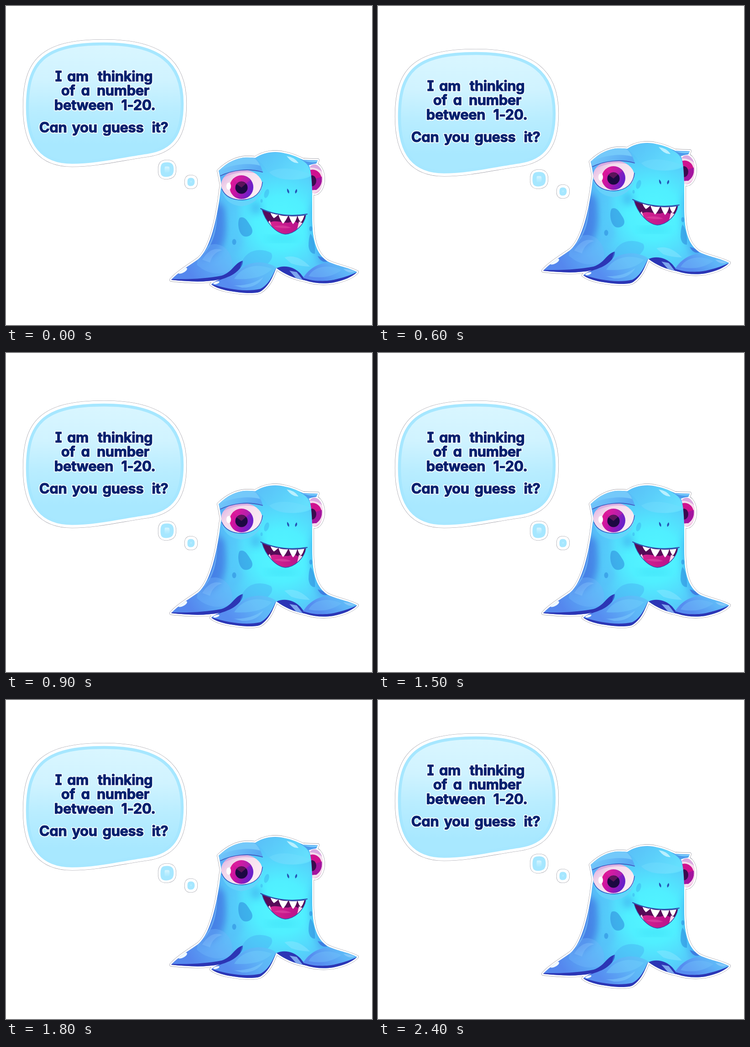
Animation of 802x699 px, one loop 2.7 s. Source, as an HTML page:

```html
<!DOCTYPE html>
<html lang="en">
<head>
<meta charset="utf-8">
<title>Guess the number</title>
<style>
html, body { margin: 0; width: 100%; height: 100%; overflow: hidden; background: #fff; }
svg { display: block; width: 802px; height: 699px; }

#bubble { animation: sink 2.7s step-end infinite; }
#monster { animation: rise 2.7s step-end infinite; }
@keyframes sink {
  0%, 88.888% { transform: translateY(0); }
  11.111%, 77.777% { transform: translateY(9px); }
  22.222%, 66.666% { transform: translateY(21px); }
  33.333%, 55.555% { transform: translateY(31px); }
  44.444% { transform: translateY(42px); }
}
@keyframes rise {
  0%, 88.888% { transform: translateY(0); }
  11.111%, 77.777% { transform: translateY(-11px); }
  22.222%, 66.666% { transform: translateY(-20px); }
  33.333%, 55.555% { transform: translateY(-30px); }
  44.444% { transform: translateY(-40px); }
}

.edge { fill: #fff; stroke: #92929c; stroke-linejoin: round; }
.rim { fill: #fff; stroke: #fff; stroke-linejoin: round; }
#bubble .edge { stroke-width: 20.2px; }
#bubble .rim { stroke-width: 19px; }
#bubble .skin { stroke: #a6e7ff; stroke-width: 6.5px; fill: url(#sky); }
#monster .edge { stroke-width: 7.8px; }
#monster .rim { stroke-width: 6.6px; }

#words {
  font: 700 31px Inter, "Open Sans", sans-serif;
  font-feature-settings: "cv08", "cv11";
  letter-spacing: -.4px;
  text-anchor: middle;
  stroke-linejoin: round;
}
.halo { fill: #f4fcff; stroke: #f4fcff; stroke-width: 5px; }
.ink { fill: #04206e; stroke: #04206e; stroke-width: 1.1px; }
.soft { filter: url(#blur); }
.shade { fill: #2c35b5; }
.spot { fill: #2f8fe0; opacity: .6; }
.faint { opacity: .3; }
.line { fill: none; stroke-linecap: round; }
</style>
</head>
<body>
<svg viewBox="0 0 802 699" role="img" aria-label="A blue monster thinking of a number">
<defs>
  <filter id="blur" x="-50%" y="-50%" width="200%" height="200%"><feGaussianBlur stdDeviation="8"/></filter>
  <linearGradient id="sky" x2="0" y2="1">
    <stop stop-color="#d9f6ff"/><stop offset=".3" stop-color="#d0f3ff"/>
    <stop offset=".55" stop-color="#b9edff"/><stop offset=".85" stop-color="#a8e8ff"/>
  </linearGradient>
  <radialGradient id="body" gradientUnits="userSpaceOnUse" cx="604" cy="474" r="230">
    <stop stop-color="#52f6ff"/><stop offset=".25" stop-color="#50efff"/>
    <stop offset=".48" stop-color="#55d2fb"/><stop offset=".72" stop-color="#5aaef6"/>
    <stop offset="1" stop-color="#5587ee"/>
  </radialGradient>
  <linearGradient id="cap" x2="1" y2=".5">
    <stop stop-color="#59bdf8"/><stop offset=".5" stop-color="#5bcefa"/><stop offset="1" stop-color="#64dffd"/>
  </linearGradient>
  <linearGradient id="brow" x2="1" y2=".3">
    <stop stop-color="#78cdfb"/><stop offset="1" stop-color="#58a9f3"/>
  </linearGradient>
  <linearGradient id="foot" x2="1" y2="-.35">
    <stop stop-color="#568cf0"/><stop offset=".5" stop-color="#5eb5f7"/><stop offset="1" stop-color="#5acbf9"/>
  </linearGradient>
  <linearGradient id="iris" x2="1" y2=".35">
    <stop stop-color="#ee1b8c"/><stop offset=".45" stop-color="#c313a6"/><stop offset="1" stop-color="#6a20c9"/>
  </linearGradient>
  <linearGradient id="white" x2="1" y2=".7">
    <stop stop-color="#d8a6df"/><stop offset=".35" stop-color="#f3d8ec"/><stop offset="1" stop-color="#fdeef4"/>
  </linearGradient>
  <linearGradient id="tongue" x2="1"><stop stop-color="#d8248f"/><stop offset="1" stop-color="#b5108b"/></linearGradient>

  <path id="cloud" d="M47 222C47 125 80 83 215 83C336 83 386 125 386 214C386 280 365 313 309 321C258 328 198 342.500 145 342.500C80 342.500 47 305 47 222Z"/>
  <path id="puff" d="M343 359C343 348 345 347 353 347C361 347 363 350 363 358C363 367 361 369 351 370C344 370 343 368 343 359Z"/>
  <path id="dot" d="M401 386C401 380 402 380 405 380C409 380 410 381 410 385C410 390 409 391 405 391C401 391 401 390 401 386Z"/>

  <path id="torso" d="M466 361C484 344 505 333 526 332Q538 332 546 333C566 320 590 317 612 323C628 326 640 332 651 337Q667 338 683 338L680 345Q671 346 664 349Q670 364 671 411L671 462C671 507 677 539 702 558C718 568 748 572 769 583C760 593 741 601 717 606C696 609 676 608 655 601C631 597 610 587 592 574C585 592 577 614 557 626C542 632 508 628 482 623Q460 618 450 610Q456 604 469 599C436 606 400 604 362 600C375 585 398 571 421 555C449 532 462 463 468 421Q470 403 472 393Q469 374 466 361Z"/>
  <ellipse id="farEye" cx="676" cy="379" rx="19" ry="32"/>
  <g id="form"><use href="#farEye"/><use href="#torso"/></g>
  <ellipse id="eye" cx="516.500" cy="391.500" rx="45" ry="33"/>
  <path id="mouth" d="M561 445C589 457 625 462 657 457C654 478 633 498 612 499C590 497 568 470 561 445Z"/>
  <clipPath id="inBody"><use href="#torso"/></clipPath>
  <clipPath id="inFar"><use href="#farEye"/></clipPath>
  <clipPath id="inEye"><use href="#eye"/></clipPath>
  <clipPath id="inMouth"><use href="#mouth"/></clipPath>

  <!-- no blanks between words: they would shift the centring -->
  <g id="words">
    <text y="164.500"><tspan x="115">I</tspan><tspan x="157.500">am</tspan><tspan x="261">thinking</tspan></text>
    <text y="196"><tspan x="136">of</tspan><tspan x="174">a</tspan><tspan x="256.500">number</tspan></text>
    <text y="227.500"><tspan x="170.500">between</tspan><tspan x="290">1-20.</tspan></text>
    <text y="276.500"><tspan x="103">Can</tspan><tspan x="172">you</tspan><tspan x="256.500">guess</tspan><tspan x="337.500">it?</tspan></text>
  </g>
</defs>

<g id="bubble">
  <use href="#cloud" class="edge"/><use href="#cloud" class="rim"/><use href="#cloud" class="skin"/>
  <use href="#puff" class="edge"/><use href="#puff" class="rim"/><use href="#puff" class="skin" style="stroke-width:9px"/>
  <use href="#dot" class="edge"/><use href="#dot" class="rim"/><use href="#dot" class="skin" style="stroke-width:7px"/>
  <use href="#words" class="halo"/><use href="#words" class="ink"/>
</g>

<g id="monster">
  <use href="#form" class="edge"/><use href="#form" class="rim"/>

  <g clip-path="url(#inFar)">
    <use href="#farEye" fill="#f5dced"/>
    <path d="M655 340H700V372Q684 349 655 355Z" fill="#d9a9e0"/>
    <ellipse cx="672" cy="381" rx="20" ry="22.500" fill="#cf128f"/>
    <path d="M670 381L692 374Q694 393 680 403H670Z" fill="#a3159f"/>
    <ellipse cx="670" cy="383" rx="10" ry="12" fill="#3a0b4e"/>
    <path d="M664 413Q690 410 697 385V415Z" fill="#e9a0d6" opacity=".6"/>
  </g>

  <use href="#torso" fill="url(#body)"/>
  <g clip-path="url(#inBody)">
    <!-- soft volume -->
    <path class="soft" d="M455 425L479 440C485 480 486 520 460 545L425 560Z" fill="#3b62dc" opacity=".62"/>
    <path class="soft" d="M487 430Q505 500 486 548Q505 545 520 520Q506 470 508 430Z" fill="#56b7f8" opacity=".5"/>
    <path class="soft" d="M680 410L667 450Q663 515 690 570L720 560Z" fill="#469ff1" opacity=".7"/>
    <ellipse class="soft" cx="548" cy="443" rx="12" ry="14" fill="#3fa4ed" opacity=".6"/>
    <ellipse class="soft" cx="604" cy="510" rx="34" ry="5" fill="#2fcfef" opacity=".5"/>
    <path d="M463 449C459 492 449 521 432 544C451 527 463 496 463 449Z" fill="#79bdf9" opacity=".65"/>

    <!-- head -->
    <path d="M543 333C575 311 629 322 654 340Q666 353 669 372C646 386 593 383 573 363Q563 343 543 333Z" fill="url(#cap)"/>
    <path d="M577 364Q607 346 668 369Q635 386 600 378Q584 373 577 364Z" fill="#74dbfc" opacity=".4"/>
    <path d="M615 329Q632 331 641 344Q628 346 615 329Z" fill="#c4f3ff" opacity=".9"/>
    <path d="M640 334Q664 341 686 337L680 346L662 349Q651 337 640 334Z" fill="#4d9bed"/>
    <path d="M648 337Q668 341 684 338L681 342Q663 344 648 337Z" fill="#79cdfb"/>

    <!-- feet -->
    <path d="M418 567C424 526 454 511 480 530Q502 550 493 581Q450 596 418 567Z" fill="#6fb6fa" opacity=".38"/>
    <path d="M430 556Q449 525 474 535Q453 540 447 562Z" fill="#8ac7fc" opacity=".35"/>
    <path class="shade" d="M359 598C400 600 440 597 472 591C497 583 499 564 519 558C520 574 503 588 470 604L420 609L359 603Z"/>
    <path class="shade" d="M592 575C609 566 632 572 645 586L659 604L632 601Q608 589 592 575Z"/>
    <path d="M621 580L637 583L651 601L637 598Z" fill="#7da6ee"/>
    <path d="M513 574C520 534 556 528 581 541Q588 552 572 566Q542 560 513 574Z" fill="#45a9f0" opacity=".4"/>
    <path class="shade" d="M449 609C490 602 530 612 592 574C588 598 578 620 558 631L500 631L449 614Z"/>
    <path d="M449 609C465 599 491 596 508 581C532 557 569 557 592 573C584 592 575 611 557 620C525 627 487 621 449 609Z" fill="url(#foot)"/>
    <path d="M500 598C518 569 552 563 583 576Q558 602 500 598Z" fill="#74d0fb" opacity=".4"/>
    <path d="M499 612Q536 614 564 594Q550 618 517 617Z" fill="#83d0fc" opacity=".45"/>
    <path class="shade" d="M645 592Q685 609 726 598Q753 592 773 581L770 594L715 613H667Z"/>
    <path d="M651 596C666 572 690 560 716 563Q748 571 771 582C741 597 697 607 666 600Z" fill="url(#foot)"/>
    <path d="M663 592C676 568 711 566 735 579Q703 601 663 592Z" fill="#72bff9" opacity=".45"/>
    <path d="M610 551Q638 542 666 571Q641 570 625 564Z" fill="#8ae8ff" opacity=".5"/>
    <path d="M683 548Q699 551 704 560Q690 563 683 548Z" fill="#3c72dc" opacity=".8"/>
    <path d="M739 576Q755 577 764 582Q752 588 739 576Z" fill="#9bd0fc" opacity=".65"/>
    <ellipse cx="387" cy="580" rx="11" ry="4.500" transform="rotate(-28 387 580)" fill="#f2fcff"/>
    <ellipse cx="461" cy="606.500" rx="7" ry="2.500" transform="rotate(-18 461 606.500)" fill="#f2fcff"/>

    <!-- spots -->
    <path class="spot" d="M512 464C524 459 530 473 536 482C546 497 535 507 523 505C509 502 506 473 512 464Z"/>
    <ellipse class="spot" cx="500" cy="517" rx="4.500" ry="6.500"/>
    <ellipse class="spot faint" cx="571" cy="411" rx="5" ry="10" transform="rotate(18 571 411)"/>
    <ellipse class="spot faint" cx="560" cy="427" rx="2.500" ry="4"/>
    <path class="spot" d="M667 499C674 506 678 525 677 543Q665 543 663 526Q663 508 667 499Z"/>
    <ellipse class="spot" cx="668" cy="488" rx="3.500" ry="5.500"/>
  </g>

  <!-- near eye -->
  <path d="M471 397Q477 435 516 439Q553 434 564 399Q550 428 517 428Q485 423 471 397Z" fill="#6bd3fb" opacity=".8"/>
  <use href="#eye" fill="url(#white)"/>
  <g clip-path="url(#inEye)">
    <path d="M470 356H565V372Q516 353 470 380Z" fill="#d4a1df" opacity=".7"/>
    <circle cx="516" cy="397" r="26" fill="url(#iris)"/>
    <path d="M516 397L498 378Q518 363 536 381Z" fill="#e0299c" opacity=".4"/>
    <circle cx="516" cy="398" r="13.500" fill="#1c0942"/>
    <path d="M516 398L505 390Q514 380 526 389Z" fill="#5b1459"/>
    <ellipse cx="488" cy="395" rx="5" ry="8" fill="#fff"/>
  </g>
  <path class="line" d="M473 401C481 420 498 425 517 425C544 424 560 409 562 386" stroke="#3b55c2" stroke-width="1.600"/>
  <path d="M466 361C484 344 505 333 526 332Q538 332 546 333Q557 345 563 364C532 355 497 359 470 372Z" fill="url(#brow)"/>
  <path d="M467 361C488 349 530 341 557 350Q551 337 543 333C516 328 488 338 467 361Z" fill="#74c9fa"/>
  <path class="line" d="M470 372C497 359 532 355 562 364" stroke="#4155bd" stroke-width="1.600"/>

  <!-- nose and mouth -->
  <path d="M616 400Q622 404 620 411Q615 408 616 400Z" fill="#2454b5"/>
  <path d="M637 401Q640 407 634 411Q632 405 637 401Z" fill="#2454b5"/>
  <g transform="translate(0 1)">
    <use href="#mouth" fill="#560b58"/>
    <g clip-path="url(#inMouth)">
      <path d="M574 476C590 463 611 479 624 472Q640 469 650 484L622 503H592Z" fill="url(#tongue)"/>
      <path d="M587 482Q608 477 625 485Q605 488 587 482Z" fill="#ec5cb2" opacity=".4"/>
      <path d="M571 476L578 469L583 484ZM638 488L642 471L650 475Z" fill="#f5d5ec"/>
      <path d="M579 450Q586 456 597 456Q592 461 587 464Q581 458 579 450ZM597 456Q606 460 618 459Q613 470 607 476Q600 467 597 456ZM620 459Q629 461 638 459Q636 470 629 477Q623 469 620 459ZM639 459L654 457Q651 468 646 473Q641 467 639 459Z" fill="#fff"/>
    </g>
    <use href="#mouth" fill="none" stroke="#3150ad" stroke-width="1.400"/>
    <path class="line" d="M558 443Q604 464 660 455" stroke="#3150ad" stroke-width="2"/>
  </g>
</g>
</svg>
</body>
</html>
```
